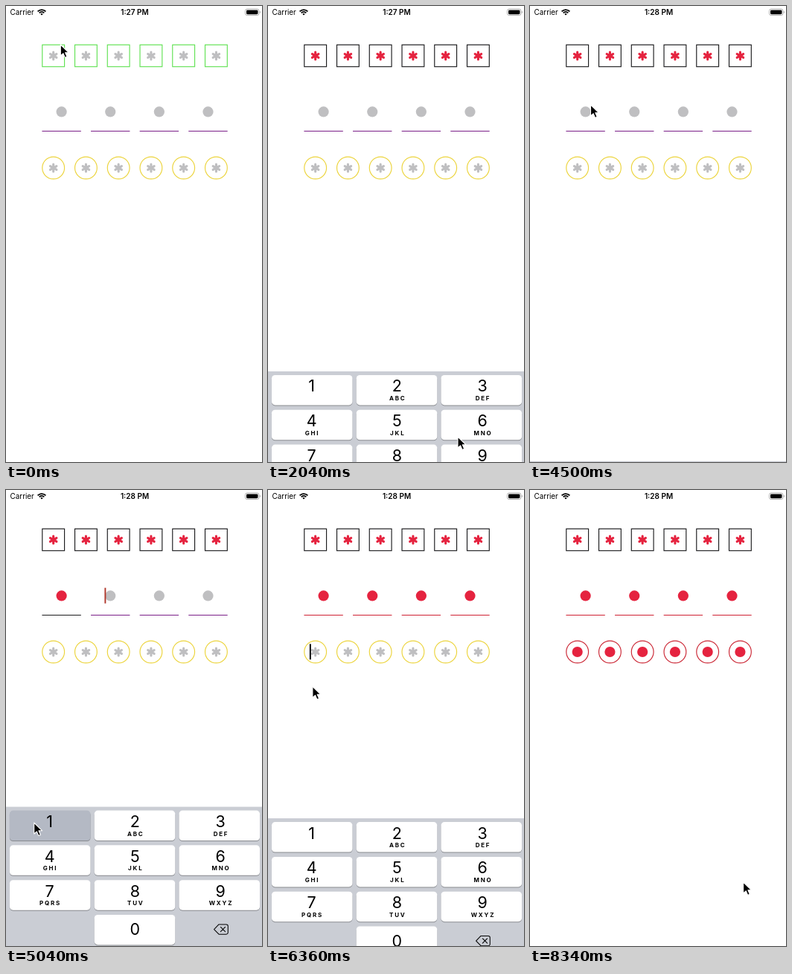
These frames come from a looping animation (344x614 px, 8400 ms). An HTML page:

```html
<!DOCTYPE html>
<html lang="en">
<head>
<meta charset="utf-8">
<title>Passcode fields</title>
<style>
  html, body { margin: 0; width: 100%; height: 100%; overflow: hidden; background: #fff; }
  svg { display: block; width: 344px; height: 614px; }
  text { font-family: Inter, "Liberation Sans", sans-serif; }
  .mid { text-anchor: middle; }
  .digit { font-size: 21.5px; }
  .letters { font-size: 8px; font-weight: 700; letter-spacing: 1.8px; }
</style>
</head>
<body>
<svg viewBox="0 0 344 614">
  <text x="5.5" y="12.2" font-size="9.9">Carrier</text>
  <g fill="none" stroke="#000" stroke-width="1.8">
    <path d="M42.6 7.4A7.4 7.4 0 0 1 53.4 7.4M44.7 9.3A4.6 4.6 0 0 1 51.3 9.3"/>
    <path d="M48 12.6L46.3 10.8A2.5 2.5 0 0 1 49.7 10.8Z" fill="#000" stroke="none"/>
  </g>
  <text id="clock" class="mid" x="173" y="12.4" font-size="10" font-weight="600"></text>
  <rect x="321.5" y="4" width="18.5" height="8.6" rx="2.6" fill="none" stroke="#a8a8a8" stroke-width=".9"/>
  <rect x="323" y="5.4" width="15.5" height="5.8" rx="1.4"/>
  <path d="M341 6.8a1.7 1.7 0 0 1 0 3z" fill="#a8a8a8"/>
  <g id="fields"></g>
  <rect id="caret" width="1.9" height="21"/>
  <g id="keyboard">
    <rect width="344" height="200" fill="#cacdd4"/>
    <path d="M279.6 165L286 158.4H296a2.3 2.3 0 0 1 2.3 2.3V169.3a2.3 2.3 0 0 1-2.3 2.3H286ZM288.4 161.9l6.2 6.2m0-6.2l-6.2 6.2"
      fill="none" stroke="#000" stroke-width="1.05" stroke-linejoin="round" stroke-linecap="round"/>
  </g>
  <path id="cursor" d="M0 0V15L3.6 11.8L6 17.4L8.7 16.3L6.3 10.8H11Z" stroke="#fff" stroke-width="1.1" stroke-linejoin="round"/>
</svg>
<script>
const LOOP = 8400, STEP = 60;
const GRAY = '#bfbfc1', RED = '#e5233f', DARK = '#1c1c1e';
const COL = 113.8, LINE = 46.8, PAD = 188.5;
const $ = id => document.getElementById(id);

function add(parent, tag, attrs, text = '') {
  const node = document.createElementNS('http://www.w3.org/2000/svg', tag);
  for (const name in attrs) node.setAttribute(name, attrs[name]);
  node.textContent = text;
  return parent.appendChild(node);
}

function star(x, y, color) {
  for (const turn of [0, 60, 120])
    add(this, 'path', {
      d: `M${x} ${y - 4.9}v9.8`, transform: `rotate(${turn} ${x} ${y})`,
      stroke: color, 'stroke-width': 3.1, 'stroke-linecap': 'round'
    });
}
function dot(x, y, color) {
  add(this, 'circle', { cx: x, cy: y, r: 7.1, fill: color });
}

const rows = [
  { size: 6, y: 67, empty: '#62e254', done: DARK, caret: '#b0362a', blank: star, mark: star,
    outline: (x, y) => ['rect', { x: x - 14.9, y: y - 14.7, width: 29.8, height: 29.4 }] },
  { size: 4, y: 142.4, empty: '#7a1f88', done: '#cf2233', caret: '#b0362a', blank: dot, mark: dot,
    outline: (x, y) => ['path', { d: `M${x - 26.2} ${y + 26.1}h52.4` }] },
  { size: 6, y: 218, empty: '#ecd43c', done: '#cb2634', caret: '#000', blank: star, mark: dot,
    outline: (x, y) => ['circle', { cx: x, cy: y, r: 14.9 }] }
];

// Every row spans the same width; gaps are a quarter of a pitch or so.
for (const row of rows) {
  const pitch = 262.5 / row.size;
  row.cells = Array.from({ length: row.size }, (_, i) => {
    const x = 41.8 + pitch * (i + .5);
    const [tag, shape] = row.outline(x, row.y);
    const frame = add($('fields'), tag, { ...shape, fill: 'none', 'stroke-width': 1.15 });
    const blank = add($('fields'), 'g'), mark = add($('fields'), 'g');
    row.blank.call(blank, x, row.y, GRAY);
    row.mark.call(mark, x, row.y, RED);
    return { x, frame, blank, mark };
  });
}

// Number pad
const layout = '123456789 0<';
const letters = ['', 'ABC', 'DEF', 'GHI', 'JKL', 'MNO', 'PQRS', 'TUV', 'WXYZ'];
const place = key => {
  const i = layout.indexOf(key);
  return [i % 3, Math.floor(i / 3)];
};
const keys = {};
for (const name of layout.replace(/[ <]/g, '')) {
  const [col, line] = place(name);
  const y = 5 + line * LINE, mid = 58.7 + col * 114.7, sub = letters[name - 1];
  const box = { x: 4.9 + col * COL, y, width: 108.6, height: 40.5, rx: 4.6 };
  add($('keyboard'), 'rect', { ...box, y: y + 1, fill: '#898b90' });
  keys[name] = add($('keyboard'), 'rect', box);
  add($('keyboard'), 'text', { class: 'mid digit', x: mid, y: y + (name === '0' ? 27.3 : 22.5) }, name);
  if (sub) add($('keyboard'), 'text', { class: 'mid letters', x: mid + .9, y: y + 34 }, sub);
}

// One entry per focused field: tap, typing start and gap, keyboard exit ('<' deletes)
const sessions = [
  { row: 0, tap: 100, aim: [73.3, 52], keys: '123569', from: 960, gap: 190, down: 1971, rest: [2040, 255, 580] },
  { row: 0, tap: 2565, aim: [285, 58], keys: '<<85', from: 3260, gap: 260, down: 4100, rest: [3000, 301, 532] },
  { row: 1, tap: 4600, aim: [81.5, 133], keys: '1245', from: 5040, gap: 165, down: 5554, rest: [5640, 152.5, 521.5] },
  { row: 2, tap: 6100, aim: [66, 214], keys: '112259', from: 6640, gap: 200, down: 7680, rest: [8100, 286.6, 528] }
];
for (const s of sessions) {
  s.up = s.tap + 35;
  s.presses = [...s.keys].map((key, i) => ({ key, at: s.from + i * s.gap }));
}

// Cursor stops [time, x, y] follow from the taps and presses.
const stops = sessions.flatMap(s => [
  [s.tap - 120, ...s.aim],
  s.rest,
  ...s.presses.map(({ key, at }) => {
    const [col, line] = place(key);
    return [at, 37.7 + col * COL, 448 + line * LINE];
  })
]).sort((a, b) => a[0] - b[0]);

const clamp = u => Math.min(1, Math.max(0, u));
const smooth = u => u * u * (3 - 2 * u);
const spring = ms => ms <= 0 ? 0 : 1 - (1 + .018 * ms) * Math.exp(-.018 * ms);

// Moves last at most 400 ms and arrive on time.
function cursorAt(t) {
  const next = stops.findIndex(s => s[0] > t);
  if (next < 0) return stops.at(-1).slice(1);
  const [t0, x0, y0] = stops[next - 1], [t1, x1, y1] = stops[next];
  const e = smooth(clamp(1 - (t1 - t) / Math.min(400, t1 - t0)));
  return [x0 + (x1 - x0) * e, y0 + (y1 - y0) * e];
}

function drawRow(row, count, age) {
  const full = count === row.size;
  const done = `color-mix(in srgb, ${row.done} ${100 * clamp(age / 200)}%, ${DARK})`;
  row.cells.forEach((cell, i) => {
    const filled = i < count;
    cell.frame.style.stroke = !filled ? row.empty : full ? done : DARK;
    cell.blank.style.display = filled ? 'none' : '';
    cell.mark.style.display = filled ? '' : 'none';
  });
}

function drawCaret(row, count, age) {
  const full = count === row.size, cell = row.cells[full ? count - 1 : count];
  $('caret').setAttribute('x', cell.x + (full ? 6.5 : -7.8));
  $('caret').setAttribute('y', row.y - 10.7);
  $('caret').setAttribute('fill', row.caret);
  $('caret').style.display = age % 1060 < 560 ? '' : 'none';
}

function draw(t) {
  const counts = rows.map(() => 0), last = rows.map(() => 0);
  let lift = 0, held = '';
  for (const s of sessions.filter(s => s.tap <= t)) {
    lift += spring(t - s.up) - spring(t - s.down);
    last[s.row] = s.tap;
    for (const { key, at } of s.presses.filter(p => p.at <= t)) {
      counts[s.row] += key === '<' ? -1 : 1;
      last[s.row] = at;
      if (t - at < 80) held = key;
    }
  }
  rows.forEach((row, r) => drawRow(row, counts[r], t - last[r]));
  const focus = sessions.find(s => t >= s.tap && t < s.down);
  if (focus) drawCaret(rows[focus.row], counts[focus.row], t - last[focus.row]);
  else $('caret').style.display = 'none';
  for (const name in keys) keys[name].setAttribute('fill', name === held ? '#b4b9c4' : '#fff');
  $('keyboard').setAttribute('transform', `translate(0 ${614 - PAD * lift})`);
  $('cursor').setAttribute('transform', `translate(${cursorAt(t)})`);
  $('clock').textContent = t < 3900 ? '1:27 PM' : '1:28 PM';
}

const start = performance.now();
function tick() {
  const t = (performance.now() - start) % LOOP;
  draw(Math.floor(t / STEP) * STEP);
  requestAnimationFrame(tick);
}
tick();
</script>
</body>
</html>
```
